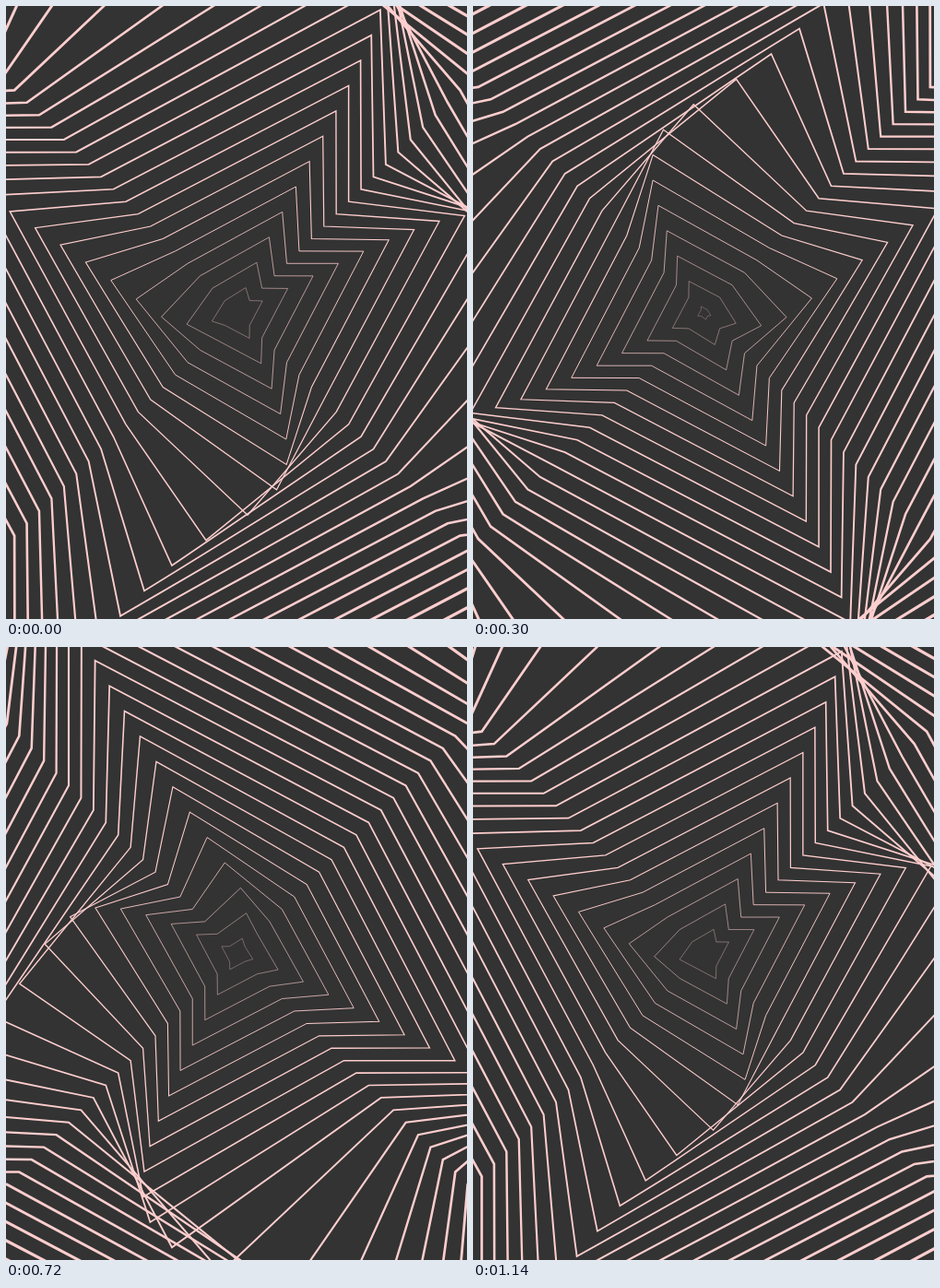
An HTML page with a canvas that plays this animation: 500x665 px, repeating every 1170 ms.

```html
<!DOCTYPE html>
<html lang="en">
<head>
<meta charset="utf-8">
<title>Expanding star rings</title>
<style>
  html, body { margin: 0; width: 100%; height: 100%; overflow: hidden; background: #333; }
  canvas { display: block; }
</style>
</head>
<body>
<canvas id="stage" width="500" height="665"></canvas>
<script>
const ctx = document.getElementById('stage').getContext('2d');
const W = 500, H = 665;
const CX = 250.8, CY = 333;
const STEPS = 39, STEP_MS = 30;   // one loop
const RINGS = 29, GAP = 27.4;     // ring count and spacing
const HALF = 0.49;                // inner corner and slide limit, relative to radius
const CYCLE = 40;                 // steps for a point to slide there and back

// cubic-bezier(.81, 0, .29, 1)
function ease(x) {
  let lo = 0, hi = 1, s = 0.5;
  for (let i = 0; i < 30; i++) {
    s = (lo + hi) / 2;
    const r = 1 - s;
    if (3 * r * r * s * 0.81 + 3 * r * s * s * 0.29 + s * s * s < x) lo = s;
    else hi = s;
  }
  return s * s * (3 - 2 * s);
}

// Position of a point along its side, from HALF to -HALF and back
function slide(step) {
  const p = step / (CYCLE / 2);
  const y = p < 1 ? ease(p) : 1 - ease(p - 1);
  return HALF * (1 - 2 * y);
}

const slides = Array.from({ length: CYCLE }, (_, i) => slide(i));
const slideAt = step => slides[((step % CYCLE) + CYCLE) % CYCLE];

function ring(r, age) {
  const q = r * HALF;
  const [top, right, bottom, left] = [0, 15, 10, 5].map(lag => r * slideAt(age + lag));
  ctx.beginPath();
  ctx.moveTo(top, -r);
  ctx.lineTo(q, -q);
  ctx.lineTo(r, right);
  ctx.lineTo(q, q);
  ctx.lineTo(-bottom, r);
  ctx.lineTo(-q, q);
  ctx.lineTo(-r, -left);
  ctx.lineTo(-q, -q);
  ctx.closePath();
  ctx.lineWidth = 0.25 + r * 0.005;
  ctx.stroke();
}

function draw(n) {
  ctx.setTransform(1, 0, 0, 1, 0, 0);
  ctx.fillStyle = '#333';
  ctx.fillRect(0, 0, W, H);
  ctx.translate(CX, CY);
  ctx.strokeStyle = '#ffcece';
  for (let k = 0; k < RINGS; k++) {
    const r = GAP * (k + n / STEPS);
    if (r > 0) ring(r, n - k + 9);
  }
}

const start = performance.now();
let shown = -1;
function tick() {
  const n = Math.floor((performance.now() - start) / STEP_MS) % STEPS;
  if (n !== shown) draw(shown = n);
  requestAnimationFrame(tick);
}
tick();
</script>
</body>
</html>
```
